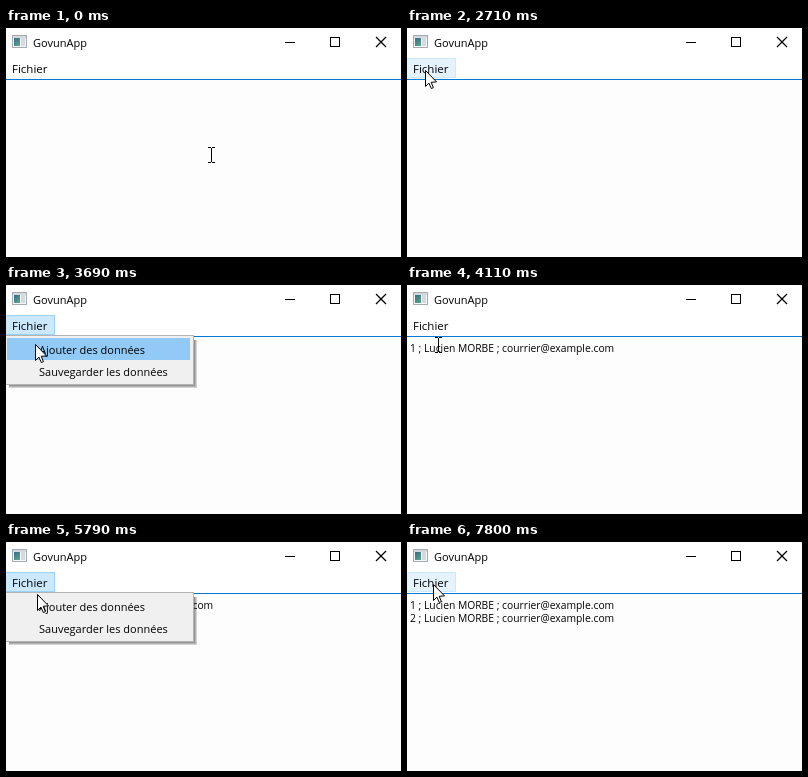
An HTML page with a canvas that plays this animation: 395x229 px, repeating every 8 s.

```html
<!DOCTYPE html>
<html lang="fr">
<head>
<meta charset="utf-8">
<title>GovunApp</title>
<style>
html, body { margin: 0; width: 100%; height: 100%; overflow: hidden; background: #fff; }
canvas { display: block; }
</style>
</head>
<body>
<canvas id="stage" width="395" height="229"></canvas>
<script>
const ctx = document.getElementById('stage').getContext('2d');
const LOOP = 8000;
const BEAM = 0, HOVER = 1, FADE = 2, MENU = 3, ITEM = 4;

// [start ms, pointer x, pointer y, interface state]
const steps = [
  [0, 205, 127, BEAM], [1460, 205, 124, BEAM], [1600, 168, 115, BEAM], [1720, 65, 80, BEAM],
  [2000, 42, 69, BEAM], [2120, 21, 60, BEAM],
  [2280, 18, 49, HOVER], [2430, 17, 46, HOVER], [2560, 18, 43, HOVER], [2710, 18, 42, HOVER],
  [3000, 18, 42, FADE], [3130, 18, 42, MENU], [3280, 21, 45, MENU],
  [3400, 26, 53, ITEM], [3540, 27, 57, ITEM], [3690, 29, 59, ITEM],
  [4110, 31, 60, BEAM],
  [4670, 30, 49, HOVER], [4790, 29, 45, HOVER], [4930, 28, 41, HOVER], [5080, 27, 40, HOVER],
  [5370, 27, 40, FADE], [5510, 27, 40, MENU], [5790, 31, 52, MENU],
  [5940, 32, 57, ITEM], [6070, 33, 60, ITEM], [6230, 33, 61, ITEM],
  [6500, 35, 62, BEAM],
  [7370, 29, 50, HOVER], [7500, 27, 45, HOVER], [7800, 26, 42, HOVER]
];
const rowTimes = [4110, 6500];

function rect(x, y, w, h, fill) {
  ctx.fillStyle = fill;
  ctx.fillRect(x, y, w, h);
}

function box(x, y, w, h, fill, edge) {
  rect(x, y, w, h, edge);
  rect(x + 1, y + 1, w - 2, h - 2, fill);
}

function text(str, x, y, size) {
  ctx.font = '500 ' + size + 'px "Open Sans", sans-serif';
  ctx.fillStyle = '#000';
  ctx.fillText(str, x, y);
}

function path(points, closed) {
  ctx.beginPath();
  for (const [x, y] of points) ctx.lineTo(x, y);
  if (closed) ctx.closePath();
}

function drawWindow() {
  rect(0, 0, 395, 229, '#fff');
  rect(0, 52, 395, 177, '#fdfdfd');
  rect(0, 51, 395, 1, '#0078d7');

  box(6, 7, 15, 13, '#f4f6f7', '#a3abb1');
  rect(7, 8, 13, 2, '#d3d9de');
  const tint = ctx.createLinearGradient(8, 11, 13, 18);
  tint.addColorStop(0, '#3a7088');
  tint.addColorStop(1, '#5aa58a');
  rect(8, 10, 6, 8, tint);
  rect(15, 10, 4, 8, '#d5dade');
  text('GovunApp', 27, 19, 11);

  rect(279, 14, 10, 1, '#000');
  box(324, 9, 10, 10, '#fff', '#000');
  ctx.strokeStyle = '#000';
  ctx.lineWidth = 1.2;
  path([[370, 9], [380, 19]]);
  ctx.stroke();
  path([[380, 9], [370, 19]]);
  ctx.stroke();
}

function drawMenu(hot, alpha) {
  ctx.globalAlpha = alpha;
  for (let i = 1; i <= 4; i++) rect(3, 55, 184 + i, 44 + i, 'rgba(0,0,0,.16)');
  box(-2, 50, 190, 50, '#f0f0f0', '#b4b4b4');
  if (hot) rect(1, 53, 183, 22, '#91c9f7');
  text('Ajouter des données', 33, 69, 11);
  text('Sauvegarder les données', 33, 91, 11);
  ctx.globalAlpha = 1;
}

function drawBeam(x, y) {
  for (const top of [y - 8, y + 7]) {
    rect(x - 3, top, 3, 1, '#000');
    rect(x + 1, top, 3, 1, '#000');
  }
  rect(x, y - 7, 1, 14, '#000');
}

function drawArrow(x, y) {
  ctx.save();
  ctx.translate(x + .5, y + .5);
  path([[0, 0], [0, 16], [3.4, 12.6], [5.8, 18], [7.9, 17.2], [5.7, 11.8], [11, 11.4]], true);
  ctx.fillStyle = '#fff';
  ctx.fill();
  ctx.strokeStyle = '#000';
  ctx.lineWidth = 1;
  ctx.stroke();
  ctx.restore();
}

function draw(now) {
  const t = now % LOOP;
  const [, x, y, state] = steps.filter(s => s[0] <= t).pop();

  drawWindow();
  rowTimes.forEach((start, i) => {
    if (t >= start) text(i + 1 + ' ; Lucien MORBE ; courrier@example.com', 3, 67 + 13 * i, 10.3);
  });
  if (state === HOVER) box(-1, 30, 50, 20, '#e5f3ff', '#cce8ff');
  if (state > HOVER) box(-1, 30, 50, 20, '#cce8ff', '#99d1ff');
  text('Fichier', 6, 45, 11.5);
  if (state > HOVER) drawMenu(state === ITEM, state === FADE ? .85 : 1);
  (state === BEAM ? drawBeam : drawArrow)(x, y);
}

function tick() {
  draw(performance.now());
  requestAnimationFrame(tick);
}
tick();
</script>
</body>
</html>
```
